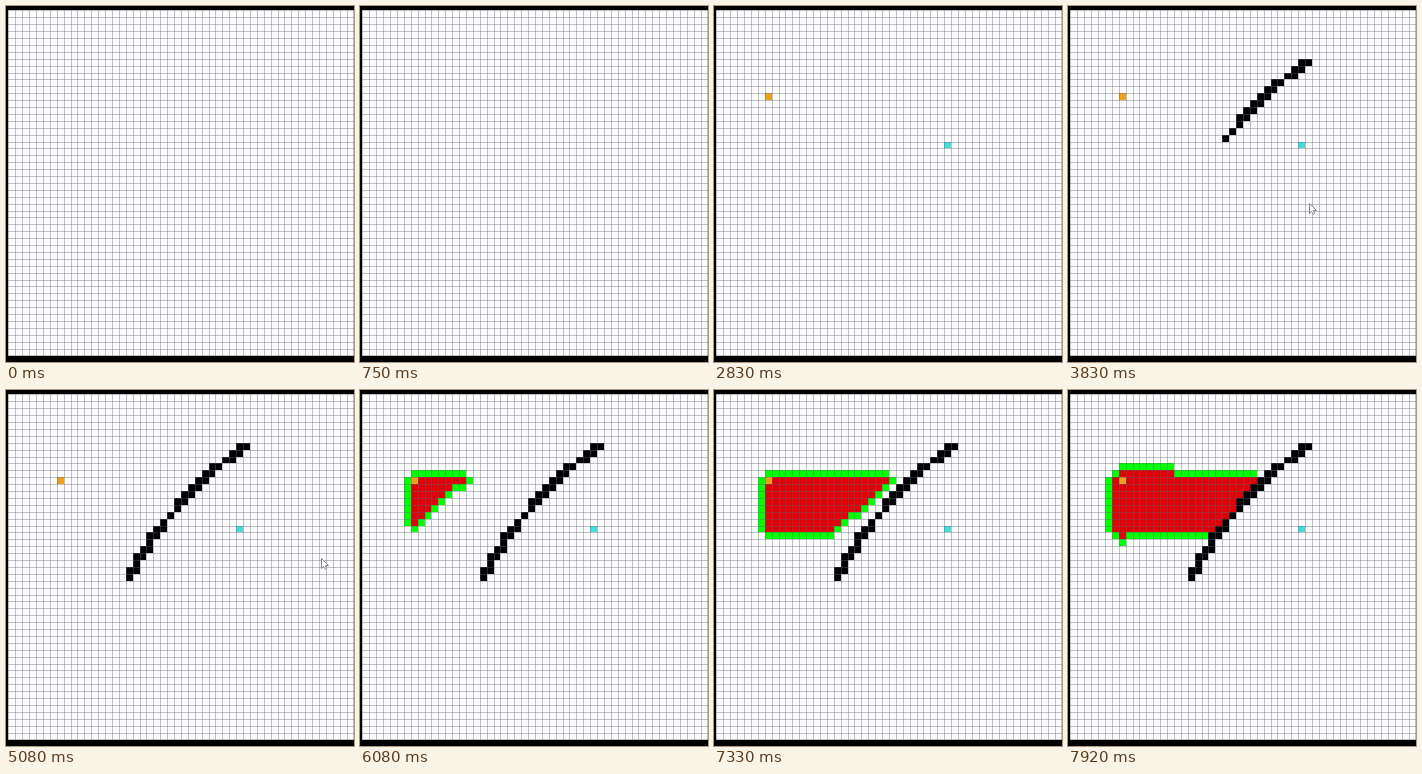
An HTML page with a canvas that plays this animation: 348 by 356 pixels, repeating every 8000 ms.

```html
<!DOCTYPE html>
<html lang="en">
<head>
<meta charset="utf-8">
<title>Grid path search</title>
<style>
html, body { margin: 0; width: 100%; height: 100%; overflow: hidden; background: #000; }
canvas { display: block; }
</style>
</head>
<body>
<canvas id="stage" width="348" height="356"></canvas>
<script>
const ctx = document.getElementById('stage').getContext('2d');
const N = 50, CELL = 6.9, LEFT = 2.4, TOP = 4.4, LOOP = 8000, FPS = 12;
const X = c => Math.round(LEFT + CELL * c);
const Y = r => Math.round(TOP + CELL * r);
const key = (c, r) => r * N + c;

const start = [7, 12], end = [33, 19];

// The wall is a brush stroke along a parabola, drawn row by row
const WALL_TOP = 7, WALL_ROWS = 20, WALL_START = 3000, ROW_TIME = 75;
const curve = u => 33.54 - 1.248 * u + .021 * u * u;
const wall = [];
for (let u = 0; u < WALL_ROWS; u++) {
  const right = Math.floor(curve(u) + .93 - .027 * u);
  for (let c = Math.floor(curve(u)); c <= right; c++) wall.push([c, WALL_TOP + u]);
}

// A* with Manhattan distance; ties go to the cell found first.
// Each cell remembers the step at which it was opened and closed.
const opened = new Map(), closed = new Map();
function search() {
  const blocked = new Set(wall.map(p => key(...p)));
  const dist = (c, r) => Math.abs(c - end[0]) + Math.abs(r - end[1]);
  const queue = [{ c: start[0], r: start[1], g: 0, f: dist(...start), id: 0 }];
  opened.set(key(...start), 0);
  for (let step = 1, id = 1; step <= 200; step++) {
    queue.sort((a, b) => a.f - b.f || a.id - b.id);
    const cur = queue.shift();
    closed.set(key(cur.c, cur.r), step);
    for (const [dc, dr] of [[1, 0], [-1, 0], [0, 1], [0, -1]]) {
      const c = cur.c + dc, r = cur.r + dr, k = key(c, r);
      if (blocked.has(k) || opened.has(k)) continue;
      opened.set(k, step);
      queue.push({ c, r, g: cur.g + 1, f: cur.g + 1 + dist(c, r), id: id++ });
    }
  }
}
search();

// Pointer moves outside the wall stroke: time, x, y
const arrive = [[1330, 352, 150], [1580, 111, 177], [1830, 81, 137], [2420, 352, 205]];
const leave = [[4425, 184, 276], [4580, 266, 215], [5083, 315, 168], [5330, 328, 155], [5660, 328, 155]];

function along(track, t) {
  const i = track.findIndex(p => p[0] > t);
  if (i < 1) return null;
  const [t0, x0, y0] = track[i - 1], [t1, x1, y1] = track[i];
  const u = (t - t0) / (t1 - t0);
  return [x0 + (x1 - x0) * u, y0 + (y1 - y0) * u];
}

// The screen pointer runs at 1.5 times the board's coordinates
function stroke(t) {
  const u = (t - WALL_START) / ROW_TIME;
  if (u < 0 || u >= WALL_ROWS - 1) return null;
  return [1.5 * (LEFT + CELL * (curve(u) + .7)), 1.5 * (TOP + CELL * (WALL_TOP + u + .3))];
}

const arrow = new Path2D('M0 0V10L2 8L4 11L5 10L4 7H7Z');
function pointer(t) {
  const p = along(arrive, t) || stroke(t) || along(leave, t);
  if (!p) return;
  ctx.save();
  ctx.translate(Math.round(p[0]) + .5, Math.round(p[1]) + .5);
  ctx.fillStyle = '#fff';
  ctx.strokeStyle = '#84848c';
  ctx.fill(arrow);
  ctx.stroke(arrow);
  ctx.restore();
}

function cell([c, r], color) {
  ctx.fillStyle = color;
  ctx.fillRect(X(c), Y(r), X(c + 1) - X(c), Y(r + 1) - Y(r));
}

function gridLines() {
  ctx.fillStyle = 'rgba(95,95,115,.38)';
  for (let i = 0; i <= N; i++) {
    ctx.fillRect(X(i), Y(0), 1, 346);
    ctx.fillRect(X(0), Y(i), 346, 1);
  }
}

function draw(time) {
  const t = Math.floor((time % LOOP + 5) * FPS / 1000) * 1000 / FPS;
  ctx.fillStyle = '#000';
  ctx.fillRect(0, 0, 348, 356);
  ctx.fillStyle = '#fbfbfc';
  ctx.fillRect(X(0), Y(0), 346, 346);

  const step = Math.floor((t - 5642) * .0673);
  for (const [k, at] of opened) {
    if (at > step || step < 1) continue;
    cell([k % N, Math.floor(k / N)], closed.get(k) <= step ? '#e00008' : '#00ff00');
  }
  const row = WALL_TOP + (t - WALL_START) / ROW_TIME;
  wall.filter(p => p[1] <= row).forEach(p => cell(p, '#000'));
  if (t > 1900) cell(start, '#eca01c');
  if (t > 2570) cell(end, '#40e0d8');

  gridLines();
  pointer(t);
}

function tick(now) {
  draw(now);
  requestAnimationFrame(tick);
}
draw(0);
requestAnimationFrame(tick);
</script>
</body>
</html>
```
